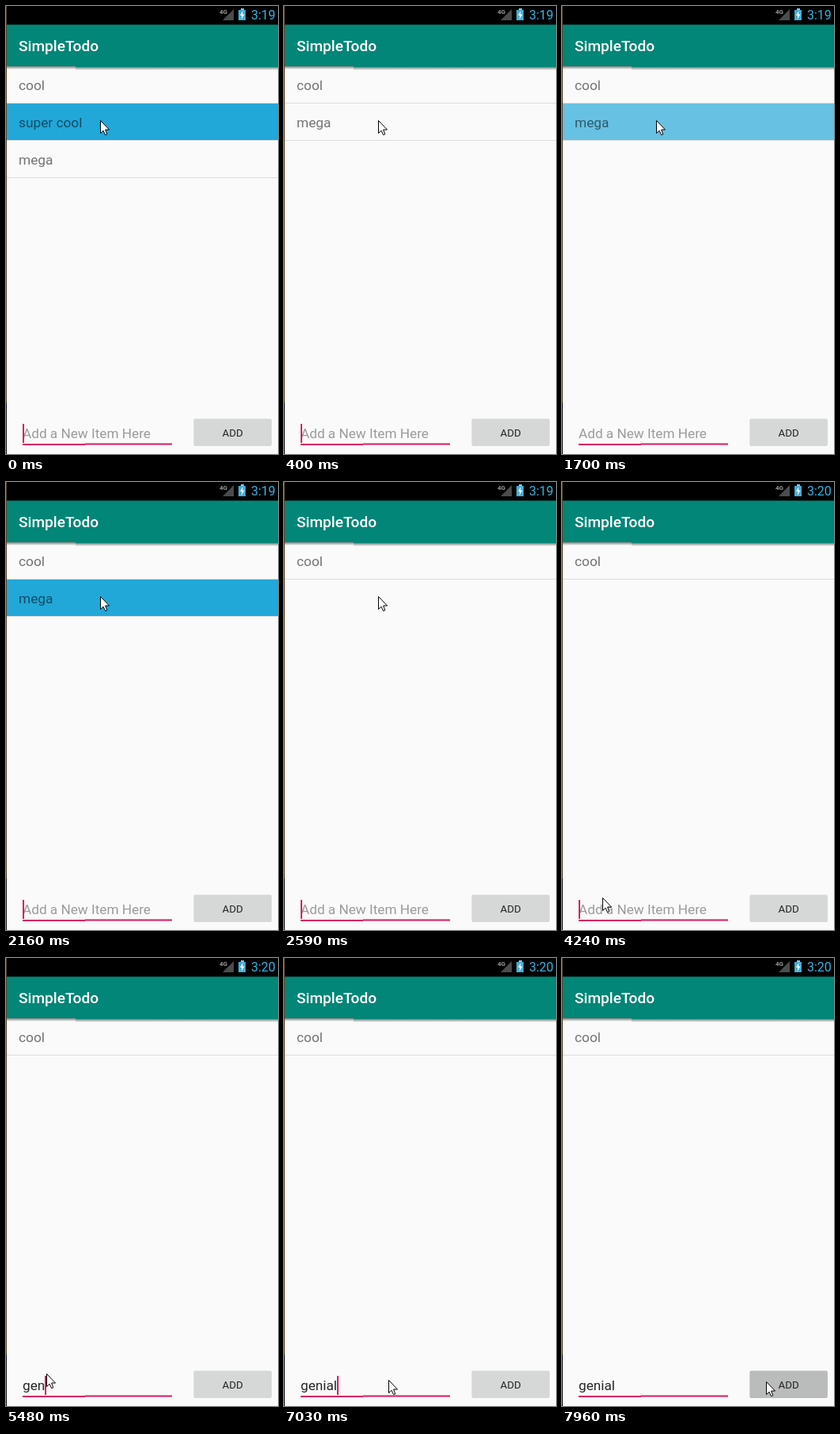
Animation, 344 px wide and 565 px high, one loop 8 s. Source, as an HTML page with a canvas:

```html
<!DOCTYPE html>
<html lang="en">
<head>
<meta charset="utf-8">
<title>SimpleTodo</title>
<style>
  html, body { margin: 0; height: 100%; overflow: hidden; background: #fafafa; }
  canvas { display: block; }
</style>
</head>
<body>
<canvas id="stage" width="344" height="565"></canvas>
<script>
const ctx = document.getElementById('stage').getContext('2d');
const LOOP = 8000;
const BLINK = 530;
const ROW = 47;
const PINK = '#d81b60';

const items = [
  { name: 'cool', until: LOOP },
  { name: 'super cool', until: 400 },
  { name: 'mega', until: 2590 }
];
const WORD = 'genial';
const keyTimes = [4490, 4950, 5480, 6760, 6910, 7030];
const TYPING_END = 7150;

// The pointer moves in visible ticks; its path is [tick, x, y].
const TICK = 400 / 3;
const path = [
  [22, 119, 144], [23, 87, 223], [25, 34, 543], [28, 51, 524],
  [51, 51, 524], [54, 173, 536], [58, 258, 534]
];

const clamp = (value, low, high) => Math.min(high, Math.max(low, value));

function pointerAt(t) {
  const tick = clamp(Math.floor((t + 55) / TICK), path[0][0], path.at(-1)[0]);
  const next = Math.max(1, path.findIndex(key => key[0] >= tick));
  const [from, to] = [path[next - 1], path[next]];
  const k = (tick - from[0]) / (to[0] - from[0]);
  return [1, 2].map(i => Math.round(from[i] + (to[i] - from[i]) * k));
}

function caretVisible(t) {
  const idle = t < keyTimes[0] ? t : Math.max(0, t - TYPING_END);
  return Math.floor(idle / BLINK) % 2 === 0;
}

// A long press deepens the highlight in two steps until the item goes.
function pressAlpha(t) {
  if (t < 400) return 1;
  if (t < 1700 || t >= 2590) return 0;
  return .68 + .16 * clamp(Math.floor((t - 1860) / 150), 0, 2);
}

function rect(x, y, w, h, color) {
  ctx.fillStyle = color;
  ctx.fillRect(x, y, w, h);
}

function text(str, x, y, size, color, weight = 400) {
  ctx.font = `${weight} ${size}px Roboto, sans-serif`;
  ctx.fillStyle = color;
  ctx.fillText(str, x, y);
}

function polygon(color, ...points) {
  ctx.beginPath();
  points.forEach(([x, y]) => ctx.lineTo(x, y));
  ctx.closePath();
  ctx.fillStyle = color;
  ctx.fill();
}

function drawBar(x, w, bottom) {
  const shadow = ctx.createLinearGradient(0, bottom, 0, bottom + 4);
  shadow.addColorStop(0, 'rgba(0,0,0,.5)');
  shadow.addColorStop(1, 'rgba(0,0,0,0)');
  rect(x, 23.5, w, bottom - 23.5, '#018677');
  rect(x, bottom, w, 4, shadow);
}

function drawHeader(t) {
  rect(1, 0, 343, 24, '#000');
  drawBar(1, 87, 76);
  drawBar(88, 256, 77);
  text('SimpleTodo', 16, 57, 19.1, '#fff', 500);

  text('4G', 270, 10, 8, '#9a9a9a', 700);
  polygon('#4c4c4c', [274, 18], [288, 4], [288, 18]);
  rect(297, 3, 4, 2, '#7fcdea');
  rect(294, 5, 9, 13, '#45add6');
  polygon('#fff', [299.5, 6], [296, 12], [298.5, 12], [297.5, 17], [301.5, 10.5], [299, 10.5]);
  text(t < 3990 ? '3:19' : '3:20', 310, 17, 16, '#33b5e5');
}

function drawList(t) {
  ctx.globalAlpha = pressAlpha(t);
  rect(1, 123, 343, 46, '#22a7d9');
  ctx.globalAlpha = 1;
  items.filter(item => t < item.until).forEach(({ name }, i) => {
    text(name, 16, 106 + i * ROW, 17.3, 'rgba(0,0,0,.54)');
    rect(1, 122 + i * ROW, 343, 1, '#dcdcdc');
  });
}

function drawInput(t) {
  const value = WORD.slice(0, keyTimes.filter(time => time <= t).length);
  text(value || 'Add a New Item Here', 21, 545, 17.2, value ? '#262626' : '#9b9b9b');
  if (caretVisible(t)) {
    rect(21 + Math.round(ctx.measureText(value).width), 527, 2, 24, PINK);
  }
  rect(21, 552, 79, 2, PINK);
  rect(100, 551.5, 110, 2, PINK);

  ctx.beginPath();
  ctx.roundRect(237.3, 520.5, 98.7, 34.5, 2);
  ctx.fillStyle = t < 7960 ? '#d6d8d7' : '#babcbb';
  ctx.fill();
  text('ADD', 273.6, 543, 13.4, '#262626');
}

function drawPointer(t) {
  const [x, y] = pointerAt(t);
  ctx.save();
  ctx.translate(x + .5, y + .5);
  polygon('#fff', [0, 0], [0, 16], [3.6, 12.7], [6, 18], [8.3, 17.3], [6.1, 11.5], [11, 11.5]);
  ctx.strokeStyle = '#000';
  ctx.stroke();
  ctx.restore();
}

function frame() {
  const t = performance.now() % LOOP;
  rect(0, 0, 344, 565, '#fafafa');
  rect(0, 0, 1, 500, '#574528');
  rect(0, 500, 1, 65, '#15161a');
  drawHeader(t);
  drawList(t);
  drawInput(t);
  drawPointer(t);
  requestAnimationFrame(frame);
}
frame();
</script>
</body>
</html>
```
